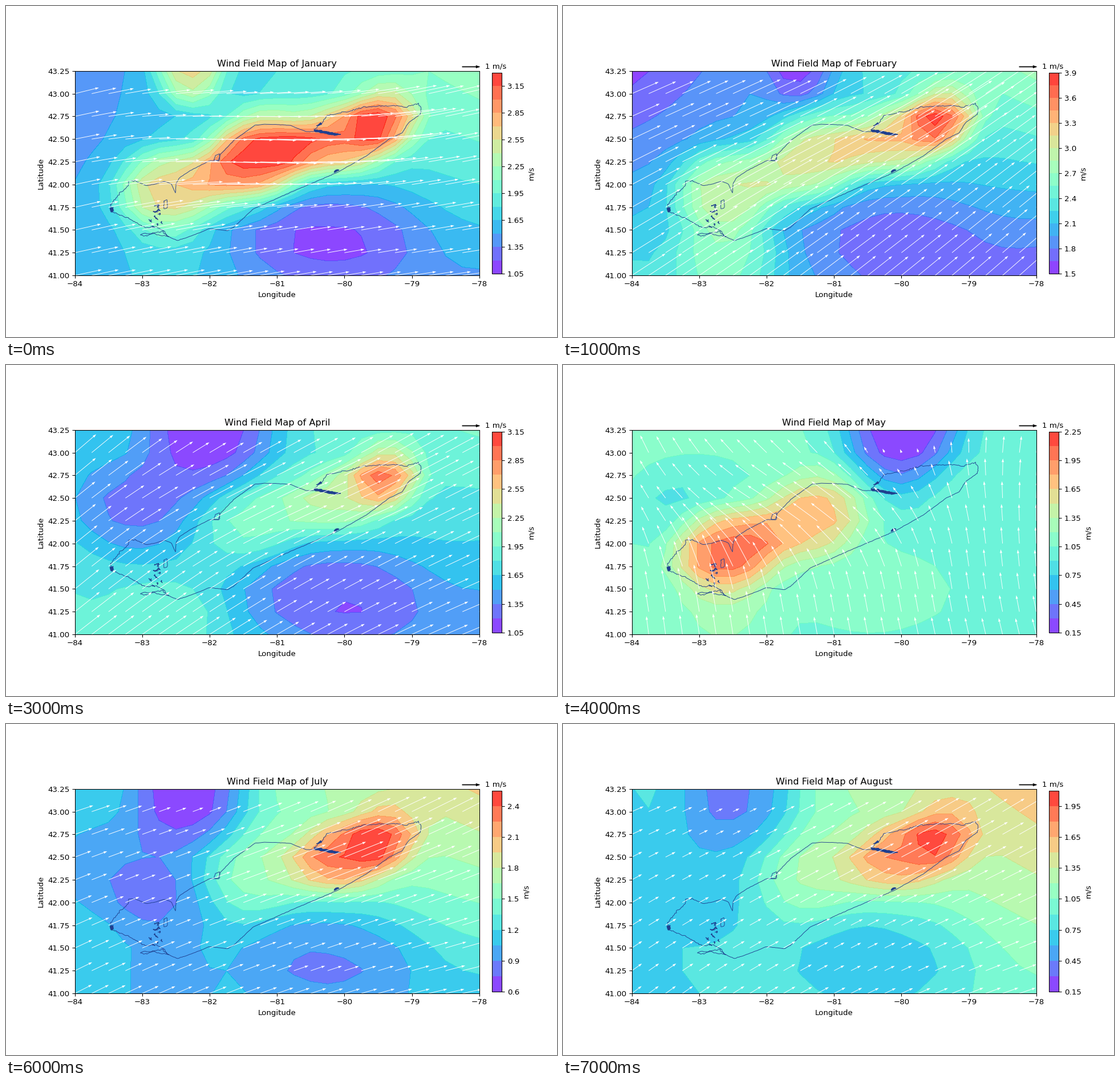
Write a matplotlib script that moves like this. It is 966 by 580 pixels and loops after 8 s.

```python
import numpy as np
import matplotlib.pyplot as plt
from matplotlib.animation import FuncAnimation
from matplotlib.patches import Polygon

W, H = 966, 580
SCALE = 0.966  # text, ticks and lines relative to the defaults
LEFT, RIGHT, TOP, BOTTOM = 120.75, 829.7, 113.7, 472.1
LON = np.linspace(-84, -78, 25)
LAT = np.linspace(41, 43.25, 10)
GX, GY = np.meshgrid(LON, LAT)
STEP = 0.15
NAVY = "#1f3f8f"

for key in ("font.size", "axes.titlepad", "axes.labelpad", "axes.linewidth",
            "xtick.major.size", "xtick.major.pad", "xtick.major.width",
            "ytick.major.size", "ytick.major.pad", "ytick.major.width"):
    plt.rcParams[key] *= SCALE


def bump(lon, lat, length, width, tilt=0):
    """Flat-topped hill of height one, turned by tilt degrees."""
    x, y = GX - lon, (GY - lat) * 1.35
    c, s = np.cos(np.radians(tilt)), np.sin(np.radians(tilt))
    r = np.hypot((x * c + y * s) / length, (y * c - x * s) / width)
    return np.exp(-r ** 3)


def blend(nw, ne, sw, se):
    """Bilinear surface through the four corner values."""
    x, y = (GX + 84) / 6, (GY - 41) / 2.25
    return y * (nw + x * (ne - nw)) + (1 - y) * (sw + x * (se - sw))


# Areas whose wind rises or falls from month to month
AREAS = {
    "west": bump(-82.6, 41.95, 0.8, 0.6, 5),
    "mid": bump(-81.3, 42.3, 0.8, 0.62, 20),
    "east": bump(-80.0, 42.5, 0.8, 0.5, 12),
    "peak": bump(-79.35, 42.75, 0.5, 0.42),
    "south": bump(-80.2, 41.45, 1.4, 0.75),
    "shore": bump(-82.6, 41.2, 0.8, 0.6),
    "inland": bump(-83.2, 42.4, 0.9, 0.7),
}
TURN = bump(-81.5, 42.5, 2.2, 1.1)


def wind(corners, north, angles, turn, **gains):
    """Speed and direction; north is the (lon, gain, size) of the upper area."""
    lon, gain, size = north
    z = blend(*corners) + gain * bump(lon, 43.25, size, size)
    z += sum(g * AREAS[name] for name, g in gains.items())
    return np.array([z, blend(*angles) + turn * TURN])


jan = wind((1.4, 2.2, 1.58, 1.48), (-82.3, 1.0, 0.5), (16, 14, 12, 8), -15,
           west=1.1, mid=1.6, east=1.25, peak=0.75, south=-0.42, shore=0.15)
feb = wind((1.6, 2.75, 2.3, 1.65), (-81.5, -0.5, 0.5), (23, 35, 33, 42), -4,
           west=0.95, mid=1.05, east=1.1, peak=0.95, south=-0.25, shore=0.5)
apr = wind((1.6, 1.97, 1.85, 1.38), (-82, -0.63, 1.0), (42, 28, 38, 22), -8,
           west=-0.05, mid=0.35, east=0.6, peak=0.85, south=-0.4, shore=0.2,
           inland=-0.38)
may = wind((1.15, 0.95, 1.05, 0.95), (-80, -0.85, 0.9), (110, 78, 97, 104), 48,
           west=1.05, mid=0.7, peak=0.1, south=0.1, shore=0.2, inland=-0.25)
jun = wind((1.5, 2.35, 1.5, 1.25), (-82.2, -0.93, 0.85), (13, 26, 17, 5), -2,
           west=-0.4, mid=0.3, east=1.15, peak=0.5, south=-0.35, shore=-0.2,
           inland=-0.35)
aug = wind((0.75, 1.6, 0.7, 1.0), (-82.4, -0.55, 0.9), (22, 33, 37, 18), 0,
           west=-0.1, mid=0.25, east=0.65, peak=0.4, south=-0.3, inland=-0.15)

# name, lowest level, number of bands, wind
MONTHS = [
    ("January", 1.05, 15, jan),
    ("February", 1.5, 16, feb),
    ("March", 1.35, 14, (feb + apr) / 2),
    ("April", 1.05, 14, apr),
    ("May", 0.15, 14, may),
    ("June", 0.6, 17, jun),
    ("July", 0.6, 13, (jun + aug) / 2),
    ("August", 0.15, 13, aug),
]

# Key points of the shoreline in stage pixels, with the roughness of each part
SHORES = [
    ([(297, 327), (298, 311), (304, 301), (322, 289), (357, 271), (372, 271),
      (376, 260), (400, 235), (436, 209), (455, 207), (498, 209), (526, 220),
      (540, 220)], 0.3),
    ([(540, 217), (553, 206), (564, 191), (603, 184), (627, 177), (690, 174),
      (699, 178), (724, 171), (728, 181), (726, 190)], 1.1),
    ([(726, 190), (705, 205), (695, 222), (672, 233), (630, 264), (580, 292),
      (498, 327), (433, 356), (400, 387), (388, 394), (357, 390), (322, 404),
      (300, 411), (285, 404)], 0.35),
    ([(285, 404), (272, 391), (262, 386), (245, 389), (214, 372), (185, 360),
      (183, 350), (201, 326), (212, 318), (216, 306), (228, 307)], 1.2),
    ([(228, 307), (246, 315), (262, 312), (278, 307), (290, 312), (297, 327)], 0.3),
    ([(285, 404), (275, 396), (235, 400), (243, 404), (254, 399), (285, 404)], 1.3),
    ([(277, 342), (282, 339), (283, 353), (277, 356), (277, 342)], 0.6),
    ([(365, 270), (367, 262), (375, 259), (374, 271), (365, 270)], 0.6),
]
SPITS = [
    [(540, 217), (552, 218), (588, 225), (578, 227), (541, 220)],
    [(544, 210), (552, 204), (554, 208)],
    [(575, 292), (577, 287), (585, 287), (579, 291)],
    [(182, 354), (188, 353), (188, 360), (183, 361)],
]


def to_map(points):
    x, y = np.array(points, float).T
    return np.column_stack([-84 + 6 * (x - LEFT) / (RIGHT - LEFT),
                            41 + 2.25 * (BOTTOM - y) / (BOTTOM - TOP)])


def rough(points, amp, rng):
    """Split a path into short pieces and shake the inner points."""
    p = np.array(points, float)
    dist = np.r_[0, np.cumsum(np.hypot(*np.diff(p, axis=0).T))]
    s = np.linspace(0, dist[-1], int(dist[-1] / 2.5))
    path = np.column_stack([np.interp(s, dist, p[:, k]) for k in (0, 1)])
    path[1:-1] += rng.uniform(-amp, amp, path[1:-1].shape)
    return path


def draw_coast(ax):
    rng = np.random.default_rng(4)
    for points, amp in SHORES:
        ax.plot(*to_map(rough(points, amp, rng)).T, color=NAVY, lw=0.65)
    for points in SPITS:
        ax.add_patch(Polygon(to_map(rough(points + points[:1], 0.7, rng)),
                             fc=NAVY, ec=NAVY, lw=0.6))
    # Islets scattered down to the southern bay
    for y in np.linspace(345, 387, 13):
        centre = rng.normal((264, y), (5, 1))
        islet = centre + rng.uniform(-3, 3, (5, 2))
        ax.add_patch(Polygon(to_map(islet), fc="none", ec=NAVY, lw=0.65))


def box(x0, y0, x1, y1):
    return [x0 / W, 1 - y1 / H, (x1 - x0) / W, (y1 - y0) / H]


fig = plt.figure(figsize=(W / 100, H / 100), dpi=100, facecolor="white")
ax = fig.add_axes(box(LEFT, TOP, RIGHT, BOTTOM))
cax = fig.add_axes(box(852.2, 116.6, 869.4, 469.2))


def draw(i):
    name, low, bands, (z, angle) = MONTHS[i]
    ax.clear()
    cax.clear()
    levels = np.round(low + STEP * np.arange(bands + 1), 2)
    z = np.clip(z, levels[0] + 0.01, levels[-1] - 0.01)
    filled = ax.contourf(LON, LAT, z, levels=levels, cmap="rainbow", alpha=0.8)
    draw_coast(ax)
    a = np.radians(angle)
    arrows = ax.quiver(LON, LAT, z * np.cos(a), z * np.sin(a), color="white",
                       scale=23.2, scale_units="width", width=0.0013,
                       headwidth=4.5, headlength=7, headaxislength=6.5, zorder=2.2)
    ax.quiverkey(arrows, 1.001, 1.021, 1, "1 m/s", labelpos="E", color="black",
                 labelsep=0.1 * SCALE, linewidths=0.6)
    fig.colorbar(filled, cax=cax, label="m/s")
    ax.set(xlim=(-84, -78), ylim=(41, 43.25), xlabel="Longitude", ylabel="Latitude",
           yticks=LAT, title=f"Wind Field Map of {name}")
    ax.yaxis.set_major_formatter("{x:.2f}")
    return []


anim = FuncAnimation(fig, draw, frames=len(MONTHS), interval=1000,
                     init_func=lambda: draw(0), repeat=True, repeat_delay=0)
plt.show()
```
